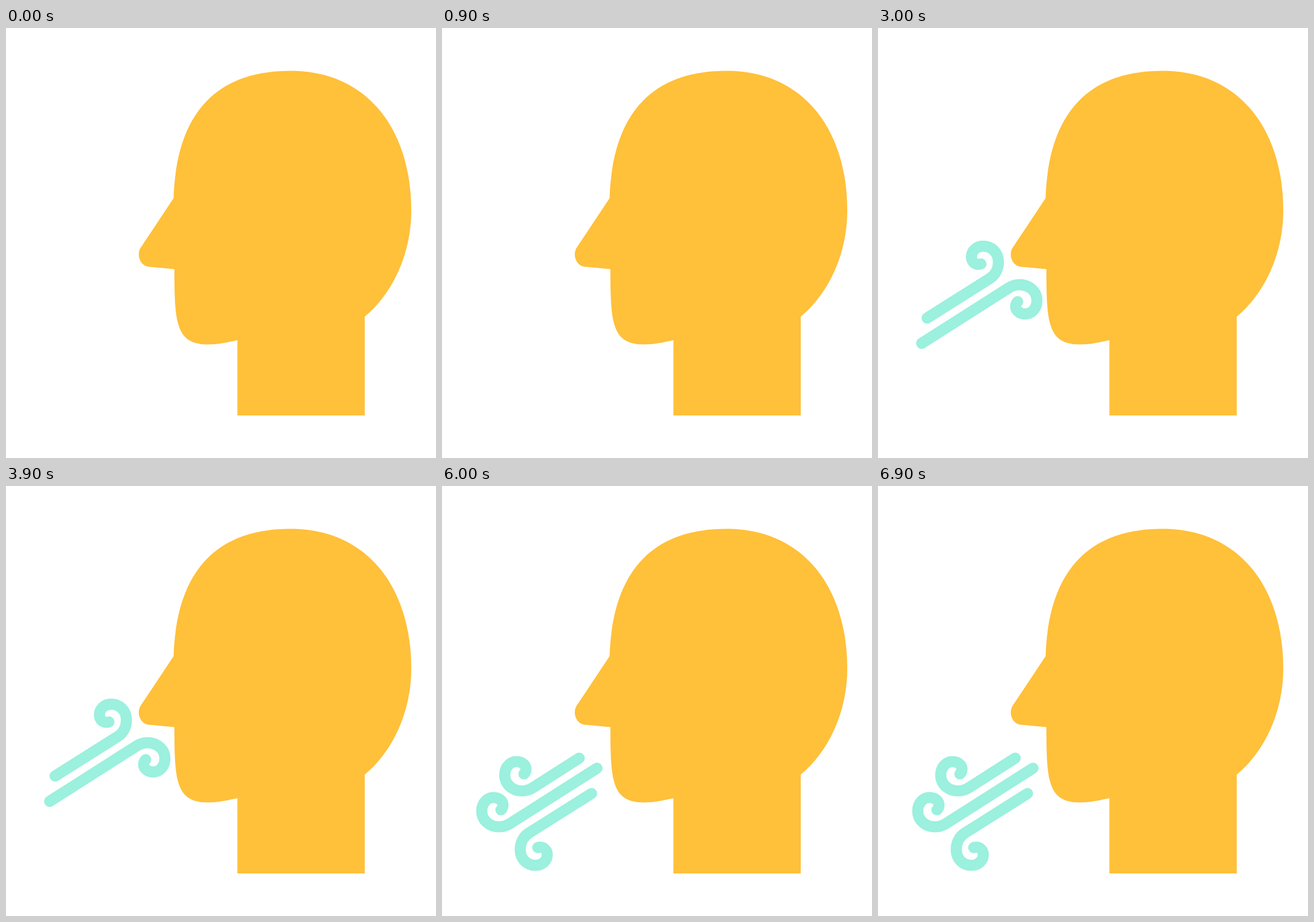
Animation, 748 px wide and 748 px high, one loop 7.5 s. Source, as an HTML page:

```html
<!DOCTYPE html>
<html lang="en">
<head>
<meta charset="utf-8">
<title>Breathing</title>
<style>
  html, body { margin: 0; width: 100%; height: 100%; overflow: hidden; background: #fff; }
  svg { display: block; width: 100%; height: 100%; }
  #air { fill: none; stroke: #9bf0de; stroke-width: 19.4; stroke-linecap: round; stroke-linejoin: round; }
</style>
</head>
<body>
<svg viewBox="0 0 748 748">
  <path fill="#ffc03a" d="M291.5 296C296.5 150 364 74.5 495 74.5C624 74.5 705 171 705 318
    C705 392 673 462 624 502V674H402.5V543C385 547 368 550.5 351 550.5
    C295.5 550.5 293 513 293 419.5L250 415.5C237 415 231 403 231 394
    C231 389 232 385 235 381Z"/>
  <g id="air">
    <path d="M85.5 504.5L194 436C204 430 209.5 419 209.5 407C209.5 391 198 379.5 183 379.5
      C171 379.5 162.5 388 162.5 398C162.5 407 170 413 179 410.5"/>
    <path d="M76 548.5L226 453C232 449 239 446.5 246 446.5C263 446.5 276.5 458 276.5 474
      C276.5 488 267 497.5 256 497.5C246 497.5 239.5 491 239.5 484.5C239.5 481 241 478 243 476"/>
    <path d="M107 566L186 515.5C192 511.5 199 509 206 509C223 509 236.5 520.5 236.5 536.5
      C236.5 550.5 227 560 216 560C206 560 199.5 553.5 199.5 547C199.5 543.5 201 540.5 203 538.5"/>
  </g>
</svg>
<script>
  const STEP = 1500, STEPS = 5;
  const air = document.getElementById('air');
  const start = performance.now();

  function draw(now) {
    const step = Math.floor(Math.max(0, now - start) / STEP) % STEPS;
    // Gusts appear one by one for the inhale, then flip for the exhale.
    [...air.children].forEach((gust, i) => {
      gust.style.display = i < step ? '' : 'none';
    });
    air.setAttribute('transform', step === STEPS - 1 ? 'rotate(180 172.8 519.7)' : '');
    requestAnimationFrame(draw);
  }
  draw(start);
</script>
</body>
</html>
```
